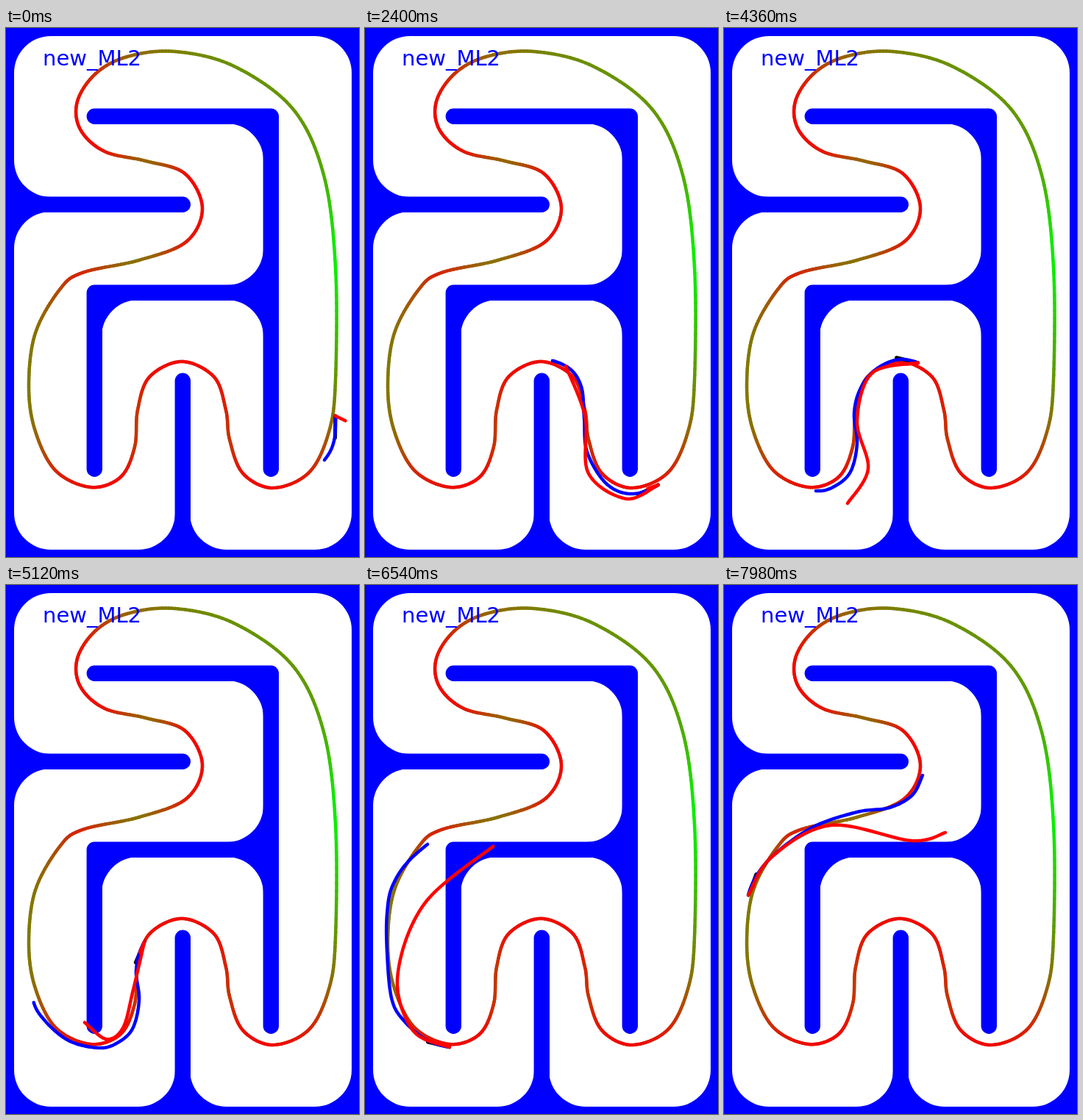
Recreate the animation shown at these times as an HTML page with a canvas. Size 480 by 720 pixels, loop 8 s.

```html
<!DOCTYPE html>
<html lang="en">
<head>
<meta charset="utf-8">
<title>Race track planner</title>
<style>
  html, body { margin: 0; width: 100%; height: 100%; overflow: hidden; background: #00f; }
  canvas { display: block; }
</style>
</head>
<body>
<canvas id="stage" width="480" height="720"></canvas>
<script>
const ctx = document.getElementById('stage').getContext('2d');
const LOOP = 8000, STEP = 20, SAMPLES = 16, CAR = 30, STEER = 15;
const BLUE = '#00f', RED = '#f00';

// Racing line: x, y, speed (0 slow, 1 fast)
const line = [
  [448,325,.95], [448,480,.6], [439,550,.4], [412,605,.15], [363,626,.05], [322,606,.06],
  [304,560,.2], [299,520,.15], [283,475,.06], [239,454,.05], [195,475,.06], [179,520,.2],
  [175,570,.2], [156,611,.05], [115,625,.05], [67,602,.15], [39,546,.42], [31,485,.48],
  [40,415,.46], [73,356,.3], [104,333,.15], [181,316,.45], [245,291,.12], [267,245,.05],
  [243,198,.06], [190,181,.4], [134,168,.1], [101,138,.05], [97,100,.06], [122,62,.18],
  [165,39,.38], [230,32,.5], [310,52,.58], [390,110,.6], [432,200,.68]
];

// Course actually driven
const course = [
  [448,528], [446,562], [433,588], [400,621], [362,634], [328,620], [302,577], [298,530],
  [294,488], [276,462], [240,451], [206,465], [185,492], [177,525], [181,565], [172,604],
  [150,624], [125,630], [85,620], [52,592], [36,562], [30,500], [30,447], [38,408],
  [65,370], [120,330], [181,309], [225,303], [256,286], [270,259]
];

// time, then car and plan end as positions in the course
const stops = [
  [0, 0, 2], [400, 0, 6], [900, 0, 6], [1400, .4, 6], [1660, .9, 7], [2480, 3.25, 9.9],
  [3320, 6, 13], [4120, 8.7, 16], [4360, 9.4, 17], [4950, 11, 19], [5860, 15, 22],
  [6580, 17.4, 24.5], [7140, 19.9, 26], [7400, 20.65, 27], [7980, 22.6, 29]
];

// time, steering angle in degrees
const steerKeys = [
  [0, [-65]], [400, [20]], [3320, [0]], [4360, [-20]], [5860, [20]], [7140, [0]], [7980, [8]]
];

// time, points of the predicted run ahead of the car
const predictions = [
  [1400, [437,577], [390,611], [345,605], [322,557]],
  [2480, [345,641], [298,600], [303,520], [280,447]],
  [3320, [301,535], [322,465], [283,415], [208,441]],
  [4360, [201,470], [181,535], [196,600], [168,647]],
  [4950, [180,525], [184,600], [145,657], [82,645]],
  [5400, [182,605], [120,667], [56,625], [38,545]],
  [5860, [130,632], [66,590], [76,510], [119,461]],
  [6580, [62,604], [42,530], [80,428], [178,348]],
  [7140, [40,495], [85,405], [155,376], [232,390]],
  [7980, [65,370], [145,327], [255,348], [301,337]]
];

// Catmull-Rom sampling
function spline(points, closed = false) {
  const n = points.length, out = [];
  const at = i => closed ? points[(i + n) % n] : points[Math.max(0, Math.min(n - 1, i))];
  for (let i = 0; i < (closed ? n : n - 1); i++) {
    const [a, b, c, d] = [at(i - 1), at(i), at(i + 1), at(i + 2)];
    for (let k = 0; k < SAMPLES; k++) {
      const u = k / SAMPLES;
      out.push(b.map((v, j) => v + u / 2 * (c[j] - a[j] +
        u * (2 * a[j] - 5 * v + 4 * c[j] - d[j] + u * (3 * (v - c[j]) + d[j] - a[j])))));
    }
  }
  out.push(at(closed ? 0 : n - 1));
  return out;
}

const mix = (a, b, u) => a.map((v, j) => v + (b[j] - v) * u);

function lerpKeys(keys, t) {
  let i = 0;
  while (i < keys.length - 2 && keys[i + 1][0] <= t) i++;
  const [t0, a] = keys[i], [t1, b] = keys[i + 1];
  return mix(a, b, (t - t0) / (t1 - t0));
}

const drive = spline(course);
const dist = [0];
for (let i = 1; i < drive.length; i++)
  dist.push(dist[i - 1] + Math.hypot(drive[i][0] - drive[i - 1][0], drive[i][1] - drive[i - 1][1]));

function pointAt(s) {
  let i = 1;
  while (i < drive.length - 1 && dist[i] < s) i++;
  return mix(drive[i - 1], drive[i], (s - dist[i - 1]) / (dist[i] - dist[i - 1]));
}

const planKeys = stops.map(([t, ...ends]) => [t, ends.map(p => dist[Math.round(p * SAMPLES)])]);

function poseAt(t) {
  const [start, end] = lerpKeys(planKeys, t);
  const [x, y] = pointAt(start), [ax, ay] = pointAt(start + 20);
  return { start, end, x, y, heading: Math.atan2(ay - y, ax - x) };
}

const turn = (x, y, angle) =>
  [x * Math.cos(angle) - y * Math.sin(angle), x * Math.sin(angle) + y * Math.cos(angle)];

// Predictions are blended in the car's own frame, growing from nothing at the start
const runKeys = predictions.map(([t, ...points]) => {
  const { x, y, heading } = poseAt(t);
  return [t, points.flatMap(([px, py]) => turn(px - x, py - y, -heading))];
});
const firstRun = runKeys[0][1];
runKeys.unshift([0, firstRun.map(() => 0)], [400, firstRun]);

function stroke(c, points, color, width = 4.5) {
  c.strokeStyle = color;
  c.lineWidth = width;
  c.lineCap = c.lineJoin = 'round';
  c.beginPath();
  points.forEach(([x, y]) => c.lineTo(x, y));
  c.stroke();
}

function fillet(c, x, y, dx, dy) {
  const r = 50;
  c.beginPath();
  c.moveTo(x, y);
  c.lineTo(x + dx * r, y);
  c.arcTo(x, y, x, y + dy * r, r);
  c.fill();
}

function drawMap() {
  const map = document.createElement('canvas');
  map.width = 480;
  map.height = 720;
  const c = map.getContext('2d');
  c.fillStyle = BLUE;
  c.fillRect(0, 0, 480, 720);
  c.fillStyle = '#fff';
  c.beginPath();
  c.roundRect(11, 11, 459, 699, 50);
  c.fill();

  // Walls on a 120 px grid
  c.fillStyle = BLUE;
  const walls = [
    [[0,2], [2,2]],
    [[2,4], [2,6]],
    [[1,1], [3,1], [3,5]],
    [[3,3], [1,3], [1,5]]
  ];
  walls.forEach(w => stroke(c, w.map(([x, y]) => [x * 120 + .3, y * 120 + .3]), BLUE, 21.4));
  for (const side of [-1, 1]) {
    fillet(c, 11, 240 + 10 * side, 1, side);
    fillet(c, 240 + 10 * side, 710, side, -1);
    fillet(c, 350, 240 + 110 * side, -1, -side);
    fillet(c, 240 + 110 * side, 370, -side, 1);
  }

  const track = spline(line, true);
  for (let i = 1; i < track.length; i++) {
    const g = track[i][2];
    stroke(c, [track[i - 1], track[i]], `rgb(${250 * (1 - g)},${250 * g},0)`);
  }
  c.fillStyle = BLUE;
  c.font = '29px "DejaVu Sans", sans-serif';
  c.fillText('new_ML2', 50, 51);
  return map;
}

const map = drawMap();

function draw(t) {
  const { start, end, x, y, heading } = poseAt(t);
  const ahead = (length, angle) => [x + length * Math.cos(angle), y + length * Math.sin(angle)];
  ctx.drawImage(map, 0, 0);
  stroke(ctx, [[x, y], ahead(CAR, heading)], '#000', 5);

  const plan = drive.filter((p, i) => dist[i] > start && dist[i] < end);
  stroke(ctx, [[x, y], ...plan, pointAt(end)], BLUE);

  const local = lerpKeys(runKeys, t), run = [[x, y]];
  for (let i = 0; i < local.length; i += 2) {
    const [dx, dy] = turn(local[i], local[i + 1], heading);
    run.push([x + dx, y + dy]);
  }
  stroke(ctx, spline(run), RED);

  const [steer] = lerpKeys(steerKeys, t);
  stroke(ctx, [[x, y], ahead(STEER, heading + steer * Math.PI / 180)], RED);
}

function frame() {
  const t = Math.floor(performance.now() % LOOP / STEP) * STEP;
  draw(t < 40 ? 0 : t);
  requestAnimationFrame(frame);
}
frame();
</script>
</body>
</html>
```
